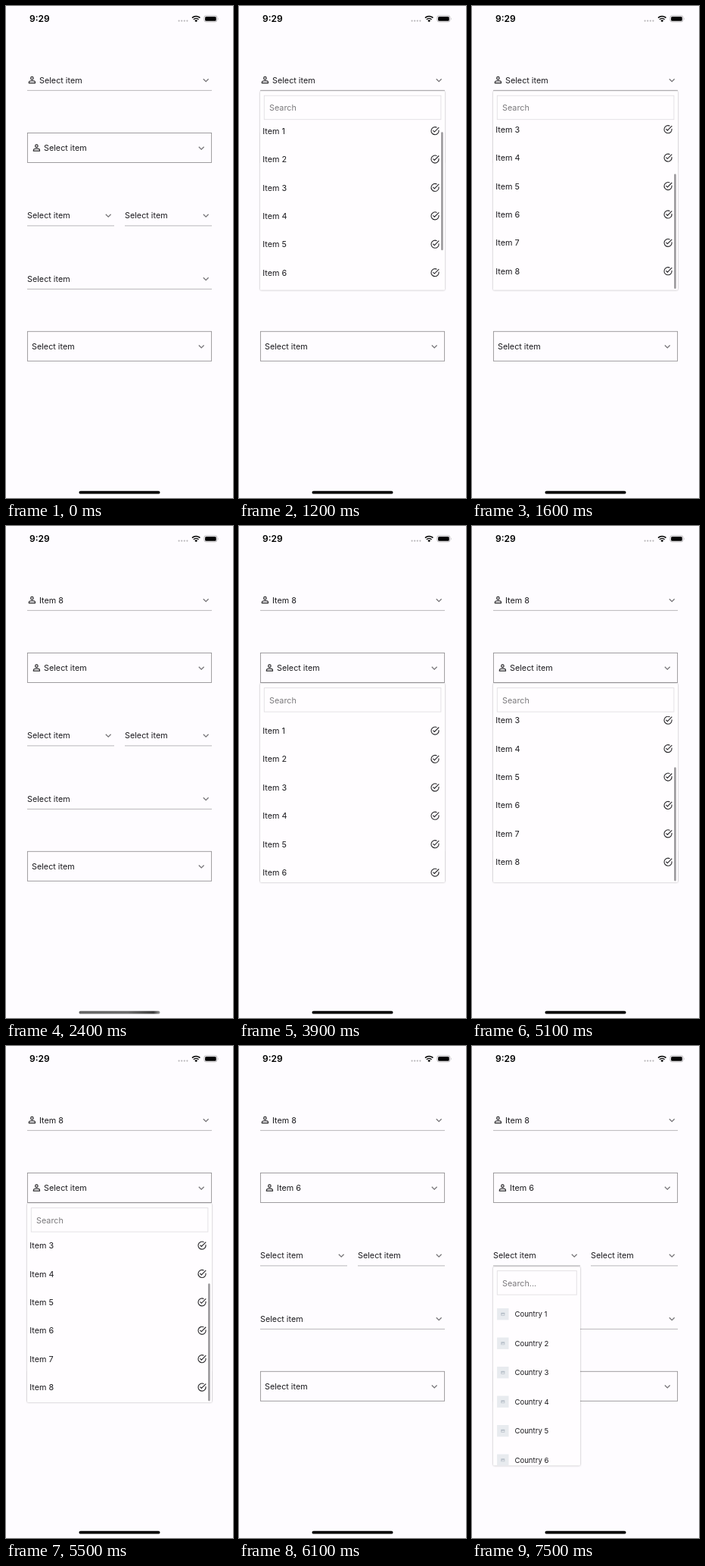
Write an HTML page that moves like this. It is 300 px wide and 649 px high and loops after 8000 ms.

```html
<!DOCTYPE html>
<html lang="en">
<head>
<meta charset="utf-8">
<title>Searchable dropdowns</title>
<style>
  @property --scroll { syntax: '<number>'; inherits: true; initial-value: 0; }
  @property --picked { syntax: '<number>'; inherits: true; initial-value: 0; }

  html, body { margin: 0; width: 100%; height: 100%; overflow: hidden; background: #fefcff; }
  svg { display: block; }
  #stage { width: 100%; height: 100%; }
  text { font: 10.8px Inter, Roboto, sans-serif; fill: #1c1b1f; }
  .clock { font-size: 12px; font-weight: 600; fill: #000; }
  .hint { fill: #7b797c; }
  .country { font-size: 9.6px; }

  .icon { fill: none; stroke: #29282b; stroke-width: 2; }
  .chevron { fill: none; stroke: #747276; stroke-width: 1.25; }
  .rule { stroke: #b2b0b3; stroke-width: .9; }
  .frame { fill: none; stroke: #949295; stroke-width: .9; }
  .search { fill: none; stroke: #e1dfe2; stroke-width: .9; }
  .surface { fill: #fffdff; filter: drop-shadow(0 .7px 1.1px #0005); }

  .field, .panel, .bar { animation: 8s step-end infinite; }
  .first.field { animation-name: pick-first; }
  .second.field { animation-name: pick-second; }
  .empty { opacity: calc(1 - var(--picked)); }
  .chosen { opacity: var(--picked); }

  .panel { opacity: 0; --gain: 1; }
  .first.panel { animation-name: show-first, scroll; }
  .second.panel { animation-name: show-second, scroll; animation-delay: 0s, 3.5s; --gain: 1.022; }
  .third.panel { animation-name: show-third; }
  .list { transform: translateY(calc(var(--scroll) * var(--gain) * -1px)); }
  .thumb {
    --top: calc(159px + var(--scroll) * var(--gain) * .72px);
    y: var(--top);
    height: min(156px, 373px - var(--top));
    opacity: var(--scroll);
    fill: #9b999c;
  }
  .bar.faded { opacity: 0; animation-name: fade-bar; }
  .bar.solid { animation-name: hide-bar; }

  @keyframes show-first { 0% { opacity: 0 } 6.25% { opacity: 1 } 28.75% { opacity: .5 } 30%, 100% { opacity: 0 } }
  @keyframes show-second { 0% { opacity: 0 } 48.75% { opacity: 1 } 75% { opacity: .5 } 76.25%, 100% { opacity: 0 } }
  @keyframes show-third { 0% { opacity: 0 } 92.5% { opacity: .5 } 93.75%, 100% { opacity: 1 } }
  @keyframes pick-first { 0% { --picked: 0 } 28.75%, 100% { --picked: 1 } }
  @keyframes pick-second { 0% { --picked: 0 } 75%, 100% { --picked: 1 } }
  @keyframes fade-bar { 0% { opacity: 0 } 30% { opacity: 1 } 48.75%, 100% { opacity: 0 } }
  @keyframes hide-bar { 0% { opacity: 1 } 30% { opacity: 0 } 48.75%, 100% { opacity: 1 } }

  /* Fling past the end, then spring back. */
  @keyframes scroll {
    0% { --scroll: 0 }
    15% { --scroll: 10 }
    16.25% { --scroll: 42 }
    17.5% { --scroll: 76 }
    18.75% { --scroll: 89 }
    20% { --scroll: 86.7 }
    21.25% { --scroll: 84 }
    22.5% { --scroll: 82 }
    23.75% { --scroll: 81 }
    25%, 100% { --scroll: 80 }
  }
</style>
</head>
<body>
<svg id="stage" viewBox="0 0 300 649" preserveAspectRatio="none">
  <defs>
    <g id="person" class="icon">
      <g transform="scale(.58) translate(-12 -12)">
        <circle cx="12" cy="8" r="3"/>
        <path d="M5 19v-2c0-2.2 4.5-3.1 7-3.1s7 .9 7 3.1v2z"/>
      </g>
    </g>
    <g id="check" class="icon">
      <g transform="scale(.56) translate(-12 -12)">
        <path d="M20.9 10.4A9 9 0 1 1 16.4 4.2M7.4 11.2l3.4 3.4L21.4 4"/>
      </g>
    </g>
    <path id="chevron" class="chevron" d="M-3.4-1.7L0 1.7 3.4-1.7"/>
    <g id="picture">
      <rect x="-7.7" y="-7.7" width="15.4" height="15.4" fill="#e8ebef"/>
      <rect x="-2.5" y="-2" width="5" height="4" rx=".5" fill="#b9c1ca"/>
      <path d="M-1.9 1.3l1.3-1.5 .8.8L1 -.5 2 1.3z" fill="#eef0f3"/>
    </g>
    <clipPath id="item-clip"><rect x="28" y="155.5" width="244" height="219"/></clipPath>
    <clipPath id="country-clip"><rect x="28" y="334" width="115" height="219.5"/></clipPath>
    <linearGradient id="sheen">
      <stop offset="0" stop-color="#666"/>
      <stop offset=".6" stop-color="#6c6c6c"/>
      <stop offset=".92" stop-color="#3c3c3c"/>
      <stop offset="1" stop-color="#999"/>
    </linearGradient>
  </defs>

  <rect width="300" height="649" fill="#fefcff"/>

  <text class="clock" x="31" y="21.3">9:29</text>
  <g fill="#b7b5b8">
    <circle cx="228.6" cy="19.6" r="1.1"/><circle cx="232.2" cy="19.6" r="1.1"/>
    <circle cx="235.8" cy="19.6" r="1.1"/><circle cx="239.4" cy="19.6" r="1.1"/>
  </g>
  <g fill="none" stroke="#000" stroke-width="1.6">
    <path d="M246 15.6a7.4 7.4 0 0 1 10.4 0M247.9 17.8a4.7 4.7 0 0 1 6.6 0"/>
    <path d="M249.3 19.3a2.7 2.7 0 0 1 3.8 0l-1.9 2z" fill="#000" stroke="none"/>
  </g>
  <rect x="261.9" y="12.7" width="17" height="8.2" rx="2.5" fill="none" stroke="#aaa8ab" stroke-width=".8"/>
  <rect x="263.1" y="13.9" width="14.6" height="5.8" rx="1.5"/>
  <path d="M280 15.4q1.2 1.4 0 2.8z" fill="#aaa8ab"/>

  <g id="fields"></g>
  <g id="panels"></g>

  <rect class="bar solid" x="96.5" y="639.8" width="107" height="3.7" rx="1.85"/>
  <rect class="bar faded" x="96.5" y="639.8" width="107" height="3.7" rx="1.85" fill="url(#sheen)"/>
</svg>
<script>
  const icon = (id, x, y) => `<use href="#${id}" x="${x}" y="${y}"/>`;
  const label = (text, x, y, cls = '') => `<text class="${cls}" x="${x}" y="${y + 4}">${text}</text>`;
  const box = (cls, x, y, w, h, extra = '') =>
    `<rect class="${cls}" x="${x}" y="${y}" width="${w}" height="${h}" ${extra}/>`;
  const repeat = (count, make) => Array.from({ length: count }, (_, i) => make(i)).join('');

  function field({ x, y, right, boxed, person, cls = '', choice }) {
    const inset = boxed ? 6 : 0;
    const textX = x + inset + (person ? 16 : 0);
    return `<g class="field ${cls}">
      ${boxed ? box('frame', x + .4, y - 19.5, right - x - .8, 39)
              : `<path class="rule" d="M${x} ${y + 13.9}H${right}"/>`}
      ${person ? icon('person', x + inset + 6.4, y) : ''}
      ${label('Select item', textX, y, 'empty')}
      ${choice ? label(choice, textX, y, 'chosen') : ''}
      ${icon('chevron', right - 7.8 - inset, y + .4)}
    </g>`;
  }

  const itemPanel = (cls, dy) => `<g transform="translate(0 ${dy})"><g class="panel ${cls}">
    ${box('surface', 28, 112.3, 244, 262.4, 'rx="1.5"')}
    ${box('search', 33.3, 118.2, 233.6, 31.5)}
    ${label('Search', 40, 134.3, 'hint')}
    <g clip-path="url(#item-clip)"><g class="list">
      ${repeat(8, i => label(`Item ${i + 1}`, 31.3, 174.7 + i * 37.4) + icon('check', 259, 174.6 + i * 37.4))}
    </g></g>
    ${box('thumb', 267.1, 159, 2.6, 156, 'rx="1.3"')}
  </g></g>`;

  const countryPanel = () => `<g class="panel third">
    ${box('surface', 28, 291.3, 115, 262.2, 'rx="1.5"')}
    ${box('search', 33.3, 296.6, 105, 31.5)}
    ${label('Search...', 40, 313, 'hint')}
    <g clip-path="url(#country-clip)">
      ${repeat(6, i => icon('picture', 40.8, 353.7 + i * 38.5) + label(`Country ${i + 1}`, 56.4, 353.2 + i * 38.5, 'country'))}
    </g>
  </g>`;

  document.getElementById('fields').innerHTML = [
    { x: 28, y: 97.5, right: 272, person: true, cls: 'first', choice: 'Item 8' },
    { x: 28, y: 187, right: 272, boxed: true, person: true, cls: 'second', choice: 'Item 6' },
    { x: 28, y: 276, right: 143 },
    { x: 157, y: 276, right: 272 },
    { x: 28, y: 359.5, right: 272 },
    { x: 28, y: 448.8, right: 272, boxed: true },
  ].map(field).join('');

  document.getElementById('panels').innerHTML =
    itemPanel('first', 0) + itemPanel('second', 95.4) + countryPanel();
</script>
</body>
</html>
```
